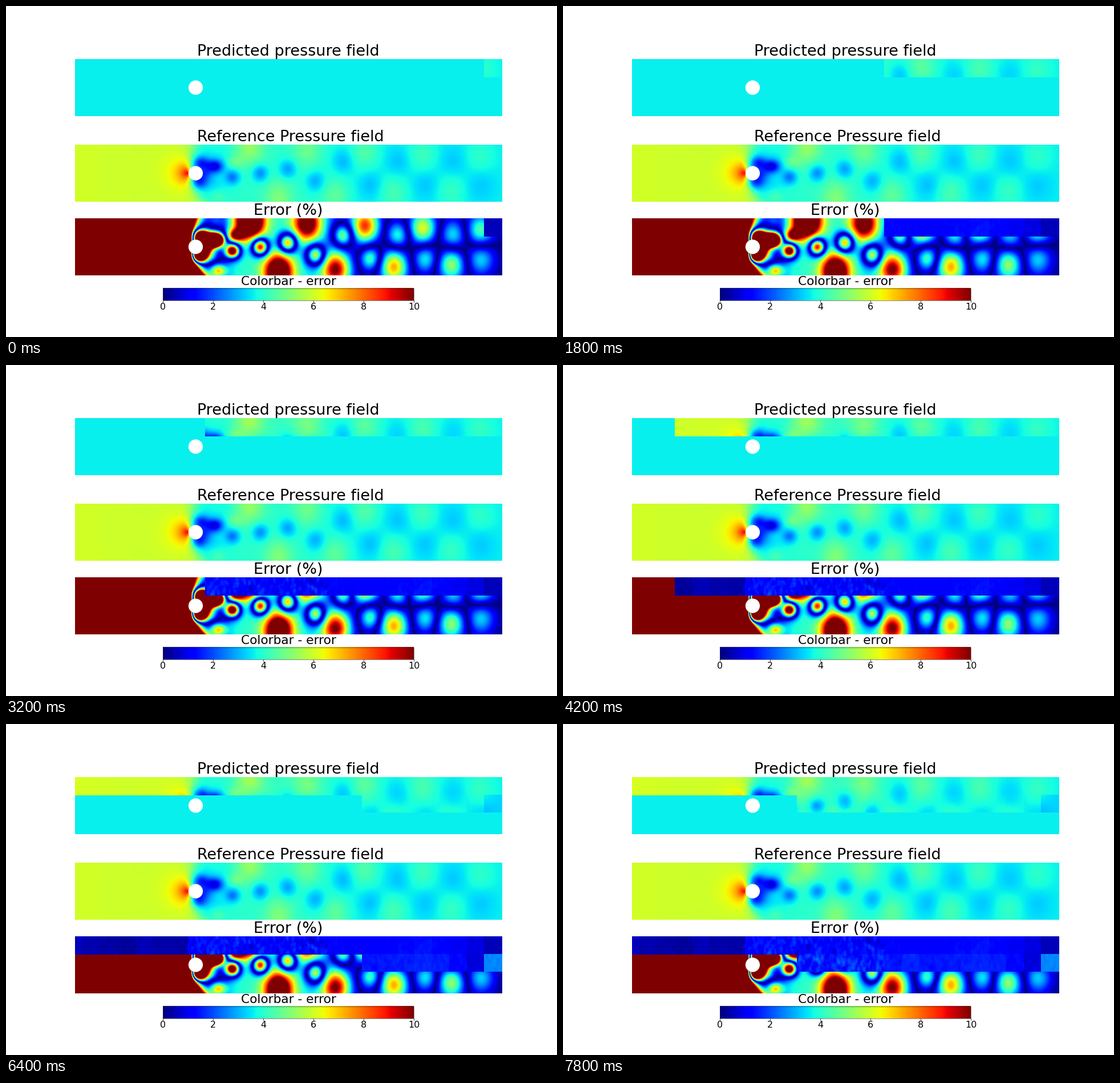
Recreate the animation shown at these times as a matplotlib script. Size 966 by 580 pixels, loop 8000 ms.

```python
import numpy as np
import matplotlib.pyplot as plt
from matplotlib.animation import FuncAnimation
from matplotlib.patches import Circle, Rectangle

W, H, DPI = 966, 580, 100
X0, X1, PH = 120.6, 869.6, 100      # panel span and height in pixels
PRED, REF, ERR = 93, 243, 372       # panel tops
CX, CY, R = 332.5, 50, 12.6         # cylinder, y measured from panel top
BASE = 36                           # initial guess, percent of the colour range
STEP, PER_ROW, START = 30.58, 25, 838
ROWS = ((0, 32), (31, 62))

x, y = np.meshgrid(X0 + np.arange(749) + 0.5, np.arange(PH) + 0.5)

# Key points of the near wake: x, y, value
WAKE = [(342, 32, -22), (366, 38, -29), (346, 51, -20), (338, 66, -20),
        (359, 65, -6), (368, 4, 2), (402, 30, 12), (372, 92, 7)]


def step(t):
    return 1 / (1 + np.exp(-np.clip(t, -50, 50)))


def background(x, y):
    """High pressure ahead of the cylinder and a weak plateau behind it."""
    d = (y - CY) / 50
    edge = 322 + np.where(d < 0, 8, 22) * d**2
    left = step((edge - x) / (1.5 + 7 * np.abs(d)))
    front = 40 * np.exp(-np.hypot(x - 320, 1.2 * (y - CY)) / 17)
    plateau = 4 * step((x - 388) / 6) * step((570 - x) / 20)
    return left * (24.5 - 0.008 * (x - X0) + front) + plateau


def extrema():
    """Rows of x, y, value, width, height."""
    pts = [(px, py, v, 10, 8) for px, py, v in WAKE]
    for i in range(10):             # vortex cores drift apart and fade
        side = -(-1)**i
        off = np.clip(7 * (i - 1), -7, 20)
        pts.append((397 + 48.3 * i, CY + side * off,
                    -3 - 9 * np.exp(-0.42 * i), 9 + 0.9 * i, 9 + 1.3 * i))
    for j in range(9):              # highs along alternating walls
        side = -(-1)**j
        pts.append((427 + 50.5 * j, CY + side * (46 - 2.2 * j),
                    17 * np.exp(-0.17 * j), 17, 21))
    return np.array(pts, float)


def bump(x, y, p):
    return np.exp(-((x - p[0]) / p[3])**2 / 2 - ((y - p[1]) / p[4])**2 / 2)


def pressure():
    # amplitudes chosen so that the sum meets every extremum
    pts = extrema()
    px, py, val = pts.T[:3]
    k = np.column_stack([bump(px, py, p) for p in pts])
    amp = np.linalg.solve(k, val - background(px, py))
    return BASE + background(x, y) + sum(a * bump(x, y, p) for a, p in zip(amp, pts))


def residuals():
    """Prediction error for both rows: one level per tile plus fine grain."""
    rng = np.random.default_rng(4)
    grain = np.kron(rng.normal(size=(PH // 4, 250)), np.ones((4, 3)))[:, :x.shape[1]]
    for axis, size in ((0, 9), (1, 5)):
        ker = np.ones(size) / size
        grain = np.apply_along_axis(np.convolve, axis, grain, ker, mode="same")
    rough = 0.12 + 0.45 * step((x - 318) / 4) * step((565 - x) / 4)

    tile = np.arange(PER_ROW)
    tx = START - tile * STEP
    level = 0.4 + 0.9 * step((tx - 305) / 5) * step((800 - tx) / 12)
    level = level + rng.uniform(-0.15, 0.15, (2, PER_ROW)) + [[0], [0.2]]
    level[1, 0] = -2.6              # second row opens with an undershoot
    col = np.clip(np.ceil((START - x) / STEP), 0, PER_ROW - 1).astype(int)
    return [lev[col] + rough * grain for lev in level]


ref = pressure()
filled = [ref + r for r in residuals()]


def predicted(n):
    p = np.full_like(ref, BASE)
    for row, (top, bottom) in enumerate(ROWS):
        k = n - row * PER_ROW
        if k >= 0:
            done = (x > START - min(k, PER_ROW - 1) * STEP) & (y > top) & (y < bottom)
            p[done] = filled[row][done]
    return p


fig = plt.figure(figsize=(W / DPI, H / DPI), dpi=DPI, facecolor="white")
ax = fig.add_axes([0, 0, 1, 1])


def show(data, box, vmax):
    return ax.imshow(data, extent=box, cmap="jet", vmin=0, vmax=vmax,
                     interpolation="nearest", aspect="auto")


def panel(top, data, vmax):
    im = show(data, (X0, X1, top + PH - 0.3, top - 0.1), vmax)
    ax.add_patch(Circle((CX, top + CY), R, fc="white", ec="none", zorder=3))
    return im


def label(px, base, text, size, ha="center"):
    ax.text(px, base, text, fontsize=size * 72 / DPI, ha=ha, va="baseline",
            family="DejaVu Sans", color="black")


pred_im = panel(PRED, predicted(0), 100)
panel(REF, ref, 100)
err_im = panel(ERR, np.abs(predicted(0) - ref), 10)

label(334.6, 87, "Predicted pressure field", 27, "left")
label(334.6, 237, "Reference Pressure field", 27, "left")
label(495, 366.4, "Error (%)", 27)
label(495.3, 489, "Colorbar - error", 21.6)

show(np.linspace(0, 10, 440)[None, :], (275, 715, 516, 494.5), 10)
ax.add_patch(Rectangle((275, 494.5), 440, 21.5, fill=False, ec="0.2", lw=0.4))
for v in range(0, 11, 2):
    px = 275 + 44 * v
    ax.plot([px, px], [516, 519], color="black", lw=0.5)
    label(px, 532.5, str(v), 16)

ax.set(xlim=(0, W), ylim=(H, 0))
ax.axis("off")


def update(n):
    p = predicted(n)
    pred_im.set_data(p)
    err_im.set_data(np.abs(p - ref))
    return pred_im, err_im


anim = FuncAnimation(fig, update, frames=40, interval=200, repeat=True,
                     repeat_delay=0, blit=False)
plt.show()
```
